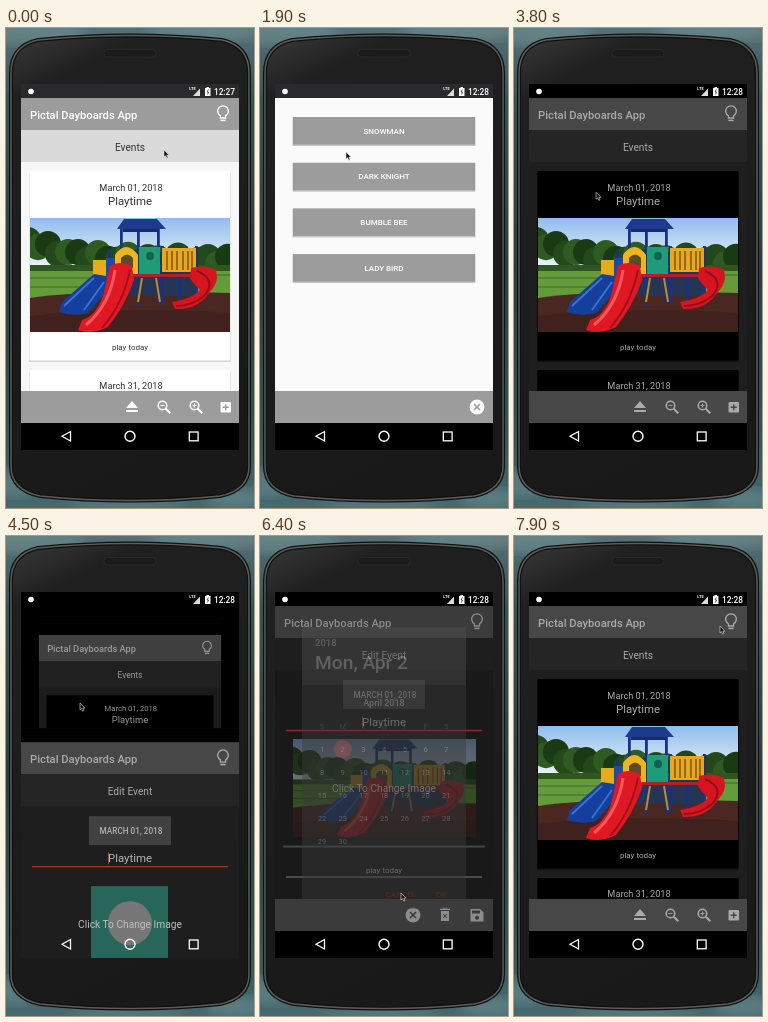
An HTML page that plays this animation: 248 px wide and 480 px high, repeating every 8000 ms.

```html
<!DOCTYPE html>
<html lang="en">
<head>
<meta charset="utf-8">
<style>
html, body { margin: 0; width: 100%; height: 100%; overflow: hidden; background: #1d3438; }
svg { display: block; width: 100vw; height: 100vh; font-family: Roboto, sans-serif; }
</style>
</head>
<body>
<svg id="stage" viewBox="0 0 248 480"></svg>
<script>
const LOOP = 8000, SLIDE = 500, TRAVEL = 366;
const APP = 'Pictal Dayboards App';
const LIGHT = { bar: '#9c9c9c', sub: '#dadada', bg: '#f7f7f7', card: '#fff', ink: '#333', icon: '#fff', status: '#2a2a2c', edge: '#d4d4d4' };
const DARK = { bar: '#474747', sub: '#252525', bg: '#1e1e1e', card: '#000', ink: '#a8a8a8', icon: '#aaa', status: '#000', edge: '#111' };

const rect = (x, y, w, h, fill, more = '') => `<rect x="${x}" y="${y}" width="${w}" height="${h}" fill="${fill}" ${more}/>`;
const circle = (x, y, r, fill, more = '') => `<circle cx="${x}" cy="${y}" r="${r}" fill="${fill}" ${more}/>`;
const path = (d, fill, more = '') => `<path d="${d}" fill="${fill}" ${more}/>`;
const line = (d, color, width = 1.3) => path(d, 'none', `stroke="${color}" stroke-width="${width}"`);
const text = (s, x, y, size, fill, weight = 400, anchor = 'middle') =>
  `<text x="${x}" y="${y}" font-size="${size}" fill="${fill}" font-weight="${weight}" text-anchor="${anchor}">${s}</text>`;
const at = (x, y, body) => `<g transform="translate(${x} ${y})">${body}</g>`;

// Playground photo as flat shapes, 200 x 114
function photo() {
  const trees = Array.from({ length: 21 }, (_, i) =>
    circle(i * 10 - 2, 42 - 20 * Math.exp(-i / 4) + 4 * Math.sin(i * 2.4), 13, ['#23481a', '#2f5a22', '#1a3a14'][i % 3])).join('');
  const posts = [[78, 32, 52], [90, 8, 72], [107, 8, 80], [127, 8, 78], [131, 28, 58], [148, 28, 58], [165, 28, 56]]
    .map(([x, y, h]) => rect(x, y, 2.8, h, '#173283')).join('');
  return rect(0, 0, 200, 114, 'url(#sky)') + trees +
    rect(0, 49, 200, 32, '#659c3a') + rect(0, 47, 200, 6, '#2f5620') +
    path('M0 80Q60 71 200 75V114H0Z', '#4b2722') + path('M0 98Q90 88 200 95V114H0Z', '#40211d') +
    line('M0 60H60M172 57H200M0 69H60', '#405238', .8) +
    rect(92, 50, 74, 28, '#253553') + posts +
    path('M87 11L94 1H127L136 11Z', '#1d3a8c') + rect(93, 11, 36, 3, '#152b6c') +
    rect(63, 42, 14, 18, '#e5ad1e') + rect(76, 40, 9, 30, '#1d4ca8') +
    path('M85 57V37Q96 21 108 37V57Z', '#efb51e') + path('M91 50V40Q97 33 103 40V50Z', '#5c4a2a') +
    rect(109, 29, 21, 27, '#1f9c77') + circle(120, 38, 4, '#14604f') +
    rect(132, 30, 34, 24, '#e9a81c') + line('M137 33V52M142 33V52M147 33V52M153 33V52M158 33V52M162 33V52', '#68491f') +
    rect(92, 56, 76, 3, '#b02028') +
    path('M64 56L76 58 78 72 58 95Q44 99 29 94L32 84Z', '#153f9d') + line('M64 60L34 88M74 64L54 92', '#3f72cf', 1.8) +
    path('M80 48Q89 42 102 48L104 62Q95 88 78 109Q62 117 48 112L52 102Q66 98 73 78Z', '#e01824') +
    line('M85 52Q80 87 56 107', '#f8585c', 3) + line('M100 52Q93 86 72 110', '#98101c', 1.8) +
    path('M161 50Q174 46 186 52L187 60Q186 68 179 75Q168 92 145 91L142 84Q162 81 170 72Q162 64 160 60Z', '#d8141f') +
    line('M167 53Q188 62 174 78Q162 88 146 88', '#8b0f1a', 2) +
    line('M112 60L108 84M126 60L130 84', '#c08b22', 2);
}

const bulb = c => at(217, 86, path('M-2.6 4V1.7A5.3 5.3 0 1 1 2.6 1.7V4Z', 'none', `stroke="${c}" stroke-width="1.3"`) + line('M-2.6 6.4H2.6', c, 1.5));
const lens = (x, c, sign) => at(x, 379, circle(-1.5, -1.5, 4.3, 'none', `stroke="${c}" stroke-width="1.5"`) + line('M1.8 1.8L6.3 6.3', c, 2) + line('M-3.6 -1.5H.6' + sign, c, .9));
const closeIcon = (x, c, mark) => at(x, 379, circle(0, 0, 7.5, c) + line('M-3-3L3 3M3-3L-3 3', mark, 1.6));

function shell(t, body, tools, header = '') {
  const head = header && rect(14, 70, 220, 32, t.bar) + rect(14, 102, 220, 32, t.sub) +
    text(APP, 24, 91, 11.2, t.icon, 500, 'start') + bulb(t.icon) + text(header, 124, 122.5, 10.2, t.ink);
  return rect(14, 56, 220, 366, t.bg) + body + head + rect(14, 56, 220, 14, t.status) +
    rect(14, 363, 220, 32, t.bar) + tools + rect(14, 395, 220, 27, '#000');
}

function eventsPage(t) {
  const card = (y, h) => rect(23, y + 1, 202, h, t.edge, 'rx="1"') + rect(23.5, y, 201, h - .5, t.card, 'rx="1"');
  const body = card(143, 190) + text('March 01, 2018', 125, 162.5, 9.2, t.ink) + text('Playtime', 124, 177, 11.4, t.ink) +
    at(24, 190, '<use href="#photo"/>') + text('play today', 124, 322, 8, t.ink) +
    card(342, 60) + text('March 31, 2018', 125, 361, 9.2, t.ink);
  const c = t.icon;
  const tools = path('M120 380L126 373 132 380ZM120 382H132V384H120Z', c) + lens(158, c, '') + lens(190, c, 'M-1.5 -3.6V.6') +
    rect(214.5, 374, 10.5, 10.5, c, 'rx="1"') + line('M216.7 379.2H222.8M219.75 376.2V382.3', t.bar, 1.4);
  return shell(t, body, tools, 'Events');
}

function themesPage() {
  const rows = ['SNOWMAN', 'DARK KNIGHT', 'BUMBLE BEE', 'LADY BIRD'].map((name, i) => {
    const y = 89 + i * 45.7;
    return rect(32.5, y + .5, 183, 28.5, '#c4c4c4') + rect(33, y, 182, 27.5, LIGHT.bar) + text(name, 124, y + 16.7, 8, '#fff', 500);
  }).join('');
  return shell({ ...LIGHT, bg: '#fafafa' }, rows, closeIcon(217, '#fff', LIGHT.bar));
}

function editPage() {
  const c = DARK.icon;
  const body = rect(83, 144, 82, 29, '#414141') + text('MARCH 01, 2018', 125, 161.5, 8.2, '#b0b0b0', 500) +
    text('Playtime', 124, 190, 11.4, '#b5b5b5') + line('M102.5 180V192', '#c73c32', 1) + line('M26 194.5H222', '#a53530', 1.3) +
    '<g id="blank">' + rect(85, 214, 77, 77, '#28665a') + circle(124, 251, 22, '#777') + '</g>' +
    '<g id="picture" transform="translate(33 203) scale(.915 .86)"><use href="#photo"/></g>' +
    text('Click To Change Image', 124, 256, 10.2, '#bdbdbd') + line('M23 310.5H225', '#555', 1.8) +
    text('play today', 124, 337, 8, '#b0b0b0') + line('M26 341H222', '#999', 1);
  const tools = closeIcon(153, c, DARK.bar) +
    path('M181 375H189V385H181ZM180 372.5H190V374H180ZM183 371.5H187V373H183Z', c) + line('M183 378L187 382M187 378L183 382', DARK.bar, 1) +
    path('M210.5 373H220L223.5 376.5V385.5H210.5Z', c) + rect(212, 374.5, 8, 3, DARK.bar) + circle(217, 381.8, 2, DARK.bar);
  return shell(DARK, body, tools, 'Edit Event');
}

function dateDialog() {
  const cell = (i, row) => [62 + i * 20.7, 193 + row * 23];
  const days = Array.from({ length: 30 }, (_, i) => {
    const [x, y] = cell(i % 7, 1 + Math.floor(i / 7));
    return (i === 1 ? circle(x, y - 3, 9, '#a33a30') : '') + text(i + 1, x, y, 7.5, '#aaa');
  }).join('');
  const week = [...'SMTWTFS'].map((d, i) => text(d, cell(i, 0)[0], 193, 7.5, '#777')).join('');
  return rect(42, 91, 164, 282, '#3b3b3b') + rect(42, 91, 164, 58, '#515151') +
    text('2018', 55, 110, 9.5, '#b4b4b4', 500, 'start') + text('Mon, Apr 2', 55, 133, 19.2, '#b4b4b4', 500, 'start') +
    `<g id="calendar">${text('April 2018', 124, 170, 9, '#aaa', 500) + week + days}</g>` +
    text('CANCEL', 141, 361, 8, '#a33a30', 500) + text('OK', 181, 361, 8, '#a33a30', 500);
}

// Back-to-front; the theme list stays above both event lists it meets
const pages = [
  { body: eventsPage(LIGHT), enter: -SLIDE, exit: 900, fade: .15 },
  { body: eventsPage(DARK), enter: 2685, exit: 4306, fade: .15, dimEntry: true },
  { body: themesPage(), enter: 900, exit: 2685, fade: 0, pivot: 229 },
  { body: editPage(), enter: 4306, exit: 7150, fade: .15 },
  { body: eventsPage(DARK), enter: 7150, exit: Infinity, fade: 0 }
];

const stage = document.getElementById('stage');
const phone = 'M5 45Q5 18 32 12Q124 3 216 12Q243 18 243 45V438Q243 462 214 468Q124 477 34 468Q5 462 5 438Z';
const haze = [[20, 5, 60, 12], [200, 3, 60, 10], [8, 455, 24, 14], [230, 470, 30, 10], [120, 478, 60, 5]]
  .map(([x, y, rx, ry]) => `<ellipse cx="${x}" cy="${y}" rx="${rx}" ry="${ry}" fill="#7fa0a2" opacity=".4" filter="url(#soft)"/>`).join('');
stage.innerHTML = `<defs>
  <linearGradient id="wall" x2="0" y2="1"><stop stop-color="#567074"/><stop offset=".15" stop-color="#355459"/><stop offset=".5" stop-color="#263f44"/><stop offset=".85" stop-color="#34555a"/><stop offset="1" stop-color="#466a6e"/></linearGradient>
  <linearGradient id="body" x2=".25" y2="1"><stop stop-color="#3a3a3a"/><stop offset=".13" stop-color="#202020"/><stop offset="1" stop-color="#191919"/></linearGradient>
  <linearGradient id="sky" x2="0" y2=".45"><stop stop-color="#8fbdec"/><stop offset="1" stop-color="#f2f6fa"/></linearGradient>
  <filter id="soft"><feGaussianBlur stdDeviation="6"/></filter>
  <filter id="fuzz"><feGaussianBlur stdDeviation=".6"/></filter>
  <clipPath id="screen">${rect(15, 56, 218, 366, '#000')}</clipPath>
  <clipPath id="crop">${rect(0, 0, 200, 114, '#000')}</clipPath>
  <g id="photo" clip-path="url(#crop)"><g filter="url(#fuzz)">${photo()}</g></g></defs>
  ${rect(0, 0, 248, 480, 'url(#wall)')}${haze}
  <g filter="url(#fuzz)">${path(phone, 'url(#body)', 'stroke="#101010" stroke-width="4"')}${path(phone, 'none', 'stroke="#5c5c5c" stroke-width="1.5"')}
  ${rect(98, 21.5, 52, 7.5, '#1b1b1b', 'rx="3.7" stroke="#2c2c2c" stroke-width=".8"')}</g>
  <g clip-path="url(#screen)">${rect(14, 56, 220, 366, '#000')}
    ${pages.map(p => `<g class="page">${p.body}</g>`).join('')}
    <g id="shade">${rect(14, 56, 220, 366, '#000')}</g><g id="dialog">${dateDialog()}</g></g>
  ${circle(25, 63.5, 2.8, '#fff')}${text('LTE', 186.5, 62, 4, '#fff', 700)}${path('M187 68L194 60.5V68Z', '#ddd')}
  ${path('M199 60H200.5V59H203V60H204.5V68H199Z', '#fff')}${line('M202.4 61.5L201 64H202.6L201.4 66.5', '#222', .7)}
  <g id="clock">${text('', 229, 66.5, 8.3, '#fff', 500, 'end')}</g>
  ${line('M64.5 403.5V413L56 408.2Z', '#fff')}${circle(124, 408.3, 5, 'none', 'stroke="#fff" stroke-width="1.4"')}${rect(183.3, 404, 8.8, 8.8, 'none', 'stroke="#fff" stroke-width="1.3"')}
  <g id="cursor">${path('M0 0V7L1.6 5.6 2.8 8.2 4 7.6 2.9 5.1H5Z', '#111', 'stroke="#ddd" stroke-width=".6"')}</g>`;

const $ = id => document.getElementById(id);
const groups = stage.querySelectorAll('.page');
const clock = $('clock').firstChild;
const clamp = v => Math.min(1, Math.max(0, v));
const show = (el, alpha) => {
  el.setAttribute('opacity', alpha);
  el.style.display = alpha > 0 ? '' : 'none';
};
const slide = (t, start) => 1 - (1 - clamp((t - start) / SLIDE)) ** 2;

const trail = [
  [0, 158, 122], [200, 158, 122], [700, 217, 87], [1250, 217, 87], [1900, 86, 124], [2400, 126, 149], [3200, 126, 149],
  [4000, 74, 167], [4600, 74, 167], [5200, 135, 159], [5700, 135, 159], [6150, 141, 357], [6500, 141, 357],
  [6900, 155, 380], [7300, 155, 380], [7850, 206, 90], [LOOP, 206, 90]
];
function pointer(t) {
  const i = trail.findIndex(k => k[0] > t);
  const [a, b] = [trail[i - 1], trail[i]];
  const u = (t - a[0]) / (b[0] - a[0]), e = u * u * (3 - 2 * u);
  return [a[1] + (b[1] - a[1]) * e, a[2] + (b[2] - a[2]) * e];
}

function draw(t) {
  pages.forEach(({ enter, exit, fade, dimEntry, pivot = 238 }, i) => {
    const inP = slide(t, enter), outP = slide(t, exit), scale = 1 - .3 * outP ** 1.2;
    const vanish = fade ? 1 : clamp((1 - outP) / .1);
    const entry = dimEntry ? clamp(.75 + (inP - .86) * 1.8) : 1;
    show(groups[i], t < enter || outP >= 1 ? 0 : (1 - fade * outP) * vanish * entry);
    groups[i].setAttribute('transform', `translate(124 ${pivot + (1 - inP) * TRAVEL}) scale(${scale}) translate(-124 ${-pivot})`);
  });
  const loaded = t >= 4560;
  show($('blank'), loaded ? 0 : 1);
  show($('picture'), loaded ? .5 : 0);
  const open = clamp((t - 5480) / 140) * clamp((6480 - t) / 180);
  show($('shade'), open * .4);
  show($('dialog'), open);
  show($('calendar'), t >= 5650 ? 1 : 0);
  clock.textContent = t < 1000 ? '12:27' : '12:28';
  $('cursor').setAttribute('transform', `translate(${pointer(t)})`);
}

const begin = performance.now();
function tick() {
  draw((performance.now() - begin) % LOOP);
  requestAnimationFrame(tick);
}
tick();
</script>
</body>
</html>
```
